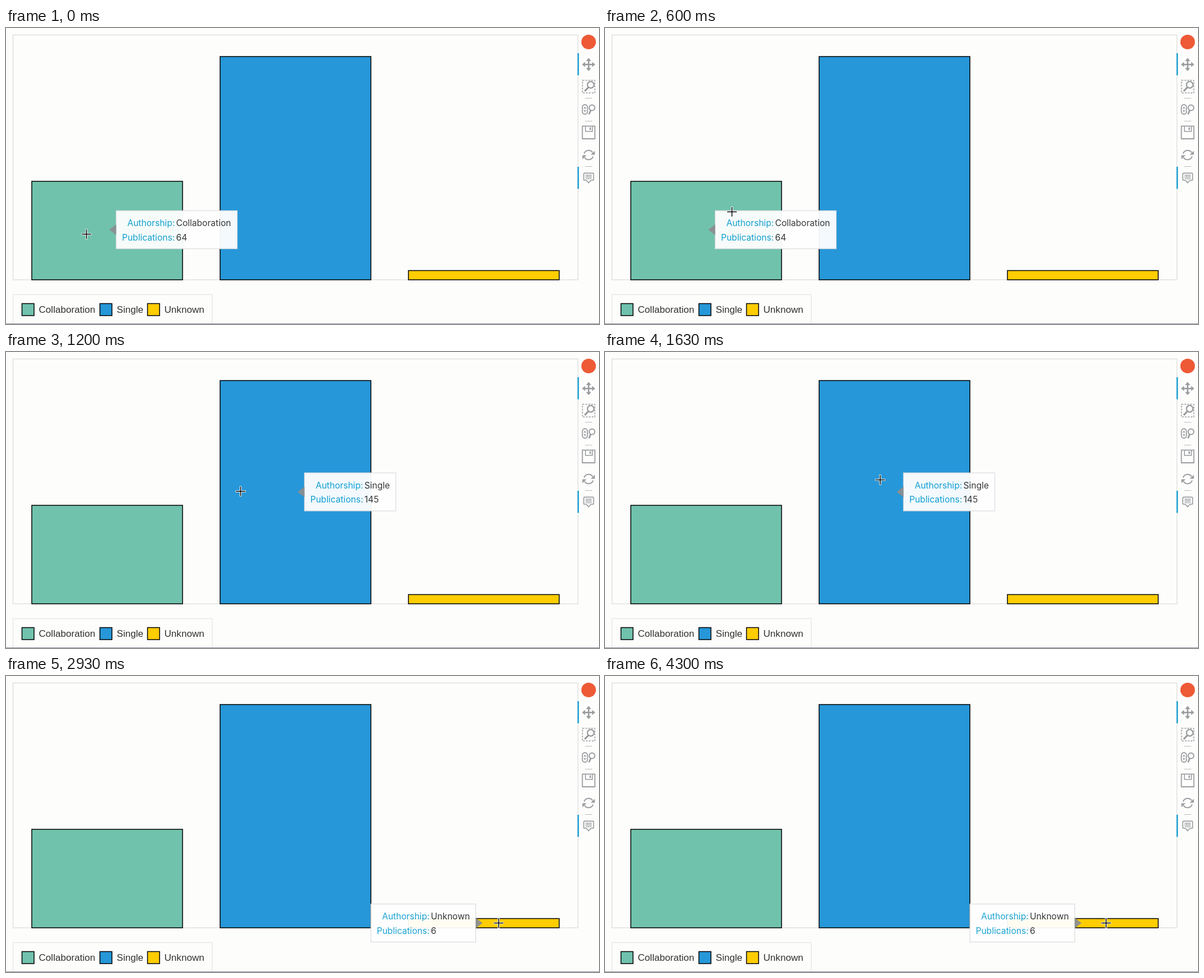
Recreate the animation shown at these times as an HTML page. Size 1058 by 529 pixels, loop 4.33 s.

```html
<!DOCTYPE html>
<html lang="en">
<head>
<meta charset="utf-8">
<title>Publications by authorship</title>
<style>
  html, body { margin: 0; width: 100%; height: 100%; overflow: hidden; background: #fdfdfc; }
  svg { display: block; width: 1058px; height: 529px; }
  .legend text { font: 17.1px "Liberation Sans", Arial, sans-serif; fill: #303030; }
  .tip text { font: 15.6px Inter, sans-serif; fill: #2f2f2f; }
  .tip .label { fill: #0f9fd0; text-anchor: end; }
  .tip rect { fill: #fff; stroke: #dcdcdf; stroke-width: 1.3; }
  .tip path { fill: #8b8e91; }
  .bar { stroke: #000; stroke-width: 1.5; }
  .tools { fill: none; stroke: #999b9e; stroke-width: 1.8; }
  .tools .solid { fill: #999b9e; stroke: none; }
  .tools .rule { stroke: #bdbdbd; stroke-width: 1.2; }
</style>
</head>
<body>
<svg viewBox="0 0 1058 529">
  <rect x="12.5" y="12.5" width="1008" height="437.5" fill="none" stroke="#dadad8" stroke-width="1.2"/>
  <g id="bars"></g>
  <g class="legend">
    <rect x="12.5" y="476.5" width="355.5" height="60" fill="none" stroke="#e3e3ec" stroke-width="1.2"/>
    <g id="legend"></g>
  </g>
  <rect y="528" width="1058" height="1" fill="#8c8c9a"/>

  <circle cx="1039.5" cy="25" r="13" fill="#ee5a36"/>
  <g fill="#1a9fd0">
    <rect x="1019.6" y="45" width="2.6" height="39.5"/>
    <rect x="1019.6" y="248" width="2.6" height="39.5"/>
  </g>
  <g class="tools">
    <path class="rule" d="M1033 125.5h13M1033 166.5h13M1033 247.5h13"/>
    <!-- pan -->
    <path d="M1032 65.2h15M1039.5 57.5v15.5" stroke-width="2.6"/>
    <path class="solid" d="M1039.5 53.5l4.6 5.4h-9.2zM1039.5 77l4.6-5.4h-9.2zM1027.8 65.2l5.4-4.6v9.2zM1051.2 65.2l-5.4-4.6v9.2z"/>
    <!-- box zoom -->
    <rect x="1028.5" y="93.5" width="22" height="22.5" stroke-width="1.5" stroke-dasharray="3.2 2"/>
    <circle cx="1043.2" cy="101.5" r="5.8" fill="#fdfdfc" stroke-width="2.2"/>
    <path d="M1039 106l-6.5 6.8" stroke-width="3.2"/>
    <!-- wheel zoom -->
    <rect x="1028.4" y="137" width="9" height="17" rx="4.5"/>
    <path class="solid" d="M1032.9 140.5l2.2 3.6h-4.4zM1032.9 150.5l2.2-3.6h-4.4z"/>
    <circle cx="1045.5" cy="142.5" r="5" stroke-width="2"/>
    <path d="M1043.2 147l-3 7.3" stroke-width="2.8"/>
    <!-- save -->
    <path d="M1028.4 175.4h22.2v22.6h-22.2z"/>
    <path d="M1033.8 175.4v9.4h12.4v-9.4" stroke-width="1.5"/>
    <path d="M1042.4 177.6v4.6" stroke-width="2.4"/>
    <!-- reset -->
    <path d="M1031.4 224.5a8.6 8.6 0 0 1 15.3-2M1047.6 229.5a8.6 8.6 0 0 1-15.3 2" stroke-width="2"/>
    <path class="solid" d="M1050.6 219.5v7h-7.4zM1028.4 234.5v-7h7.4z"/>
    <!-- hover -->
    <path d="M1032.6 259.4h14a1.8 1.8 0 0 1 1.8 1.8v10.4l-5.4 1.2-3.5 4-3.5-4-5.2-1.2v-10.4a1.8 1.8 0 0 1 1.8-1.8z" stroke-width="1.6"/>
    <path d="M1034 263.2h11M1034 266.3h11M1034 269.4h11" stroke-width="1.4"/>
  </g>
  <g id="tips"></g>
  <g id="cursor" fill="none">
    <path d="M-9.2 0H9.2M0-9.2V9.2" stroke="#fff" stroke-width="3.6"/>
    <path d="M-8.5 0H8.5M0-8.5V8.5" stroke="#000" stroke-width="1.5"/>
  </g>
</svg>
<script>
  const LOOP = 4330, STEP = 100 / 3, BASE = 450;

  // tip: left, top, width, and the side its arrow is on
  const bars = [
    { name: "Collaboration", count: 64, color: "#70c2ad", x: 46, y: 274, key: 28, tip: [196.5, 326.5, 216, -1] },
    { name: "Single", count: 145, color: "#2697d8", x: 382, y: 51, key: 167, tip: [532.5, 216, 163, -1] },
    { name: "Unknown", count: 6, color: "#ffcd00", x: 718, y: 433.5, key: 252, tip: [651, 407.5, 187, 1] }
  ];
  const BAR_W = 269, TIP_H = 68;

  // cursor path: time, x, y
  const path = [
    [0, 143.5, 368.5], [330, 156.5, 365.5], [930, 346.5, 269], [1630, 491, 228.5],
    [2170, 498, 215], [2930, 879, 441.5], [3230, 880.5, 441.5],
    [3620, 901.5, 441.5], [4050, 894, 441.5], [LOOP, 894, 441.5]
  ];

  const $ = id => document.getElementById(id);

  $("bars").innerHTML = bars.map(b =>
    `<rect class="bar" x="${b.x}" y="${b.y}" width="${BAR_W}" height="${BASE - b.y}" fill="${b.color}"/>`).join("");

  $("legend").innerHTML = bars.map(b =>
    `<rect class="bar" x="${b.key + .5}" y="492.5" width="21.5" height="21.5" fill="${b.color}"/>
     <text x="${b.key + 30.5}" y="508.7">${b.name}</text>`).join("");

  $("tips").innerHTML = bars.map(b => {
    const [x, y, w, side] = b.tip;
    const edge = side < 0 ? x : x + w;
    const row = (dy, label, value) =>
      `<text class="label" x="${x + 104.7}" y="${y + dy}">${label}:</text>
       <text x="${x + 107}" y="${y + dy}">${value}</text>`;
    return `<g class="tip" opacity=".95" visibility="hidden">
      <rect x="${x}" y="${y}" width="${w}" height="${TIP_H}"/>
      <path d="M${edge} ${y + TIP_H / 2 - 9.5}v19l${side * 12}-9.5z"/>
      ${row(27.8, "Authorship", b.name)}${row(53, "Publications", b.count)}</g>`;
  }).join("");
  const tips = [...$("tips").children];

  // monotone cubic through the path points, one axis at a time
  function curve(axis) {
    const slope = path.slice(1).map((p, i) => (p[axis] - path[i][axis]) / (p[0] - path[i][0]));
    const tangent = path.map((_, i) => {
      if (i === 0) return slope[0];
      const a = slope[i - 1], b = slope[i] || 0;
      return a * b > 0 ? 2 * a * b / (a + b) : 0;
    });
    return t => {
      let i = 0;
      while (i < path.length - 2 && t >= path[i + 1][0]) i++;
      const p = path[i], q = path[i + 1], h = q[0] - p[0], u = (t - p[0]) / h, v = 1 - u;
      return p[axis] * (1 + 2 * u) * v * v + tangent[i] * h * u * v * v
           + q[axis] * u * u * (3 - 2 * u) - tangent[i + 1] * h * u * u * v;
    };
  }
  const xAt = curve(1), yAt = curve(2);

  function draw(time) {
    const t = Math.floor((time % LOOP + 4) / STEP) * STEP;
    const x = xAt(Math.min(t, LOOP)), y = yAt(Math.min(t, LOOP));
    const snap = v => Math.round(v * 2) / 2;
    $("cursor").setAttribute("transform", `translate(${snap(x)} ${snap(y)})`);
    bars.forEach((b, i) => {
      const over = x >= b.x && x <= b.x + BAR_W && y >= b.y && y <= BASE;
      tips[i].setAttribute("visibility", over ? "visible" : "hidden");
    });
  }

  const start = performance.now();
  function tick() {
    draw(performance.now() - start);
    requestAnimationFrame(tick);
  }
  tick();
</script>
</body>
</html>
```
